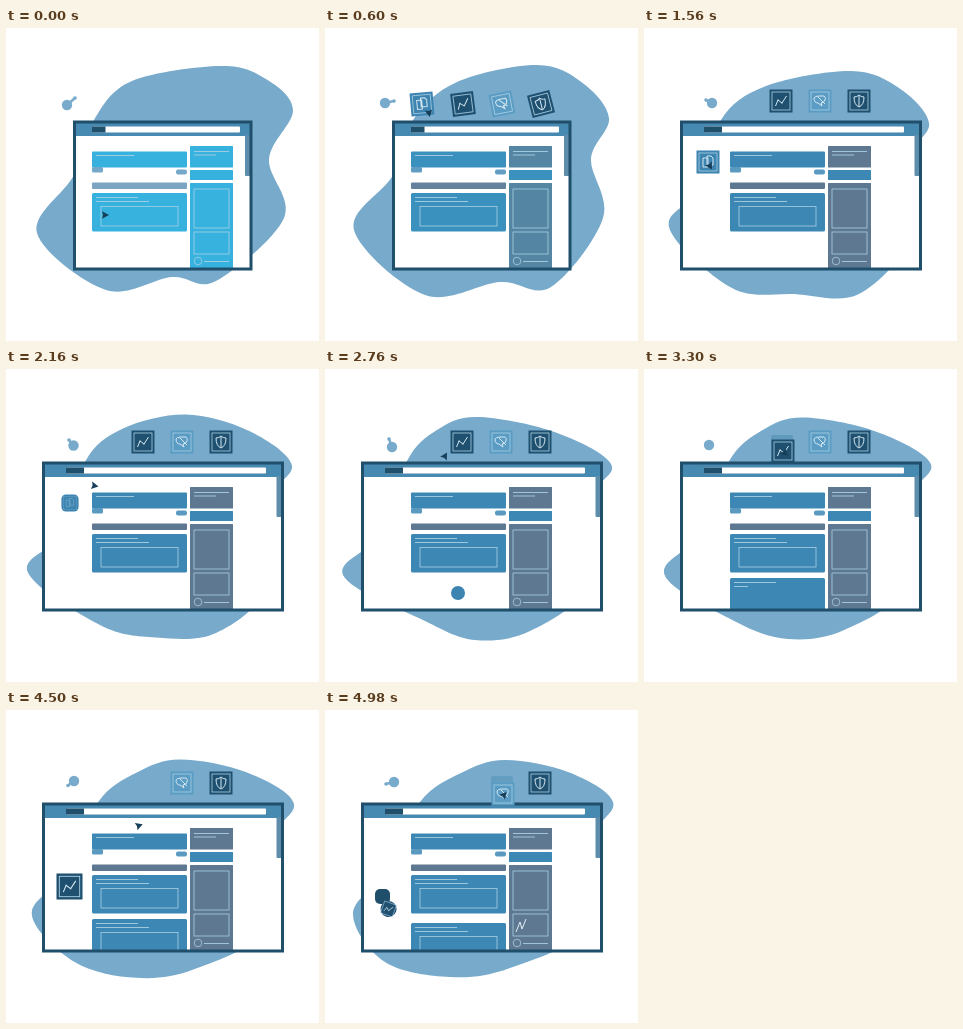
Animation of 313 by 313 pixels, one loop 5040 ms. Source, as an HTML page:

```html
<!DOCTYPE html>
<html lang="en">
<head>
<meta charset="utf-8">
<title>Window builder</title>
<style>
html, body { margin: 0; width: 100%; height: 100%; overflow: hidden; background: #fff; }
svg { display: block; width: 100vw; height: 100vh; }
</style>
</head>
<body>
<svg id="stage" viewBox="0 0 313 313"></svg>
<script>
const LOOP = 5040, STEP = 60;
const DARK = '#1f4f6b', BLUE = '#3c87b4', PALE = '#78aacb', LIGHT = '#a9cfe3';
const stage = document.getElementById('stage');

const clamp = v => Math.max(0, Math.min(1, v));
const smooth = p => p * p * (3 - 2 * p);
const linear = p => p;
const lerp = (a, b, p) => a + (b - a) * p;
const ramp = (t, from, to) => smooth(clamp((t - from) / (to - from)));

// Each key is [time, ...values].
function track(t, keys, ease = smooth) {
  let i = 0;
  while (i < keys.length - 2 && t >= keys[i + 1][0]) i++;
  const [t0, ...a] = keys[i], [t1, ...b] = keys[i + 1];
  const p = ease(clamp((t - t0) / (t1 - t0)));
  return a.map((v, n) => lerp(v, b[n], p));
}

function mix(a, b, p) {
  const channel = (c, i) => parseInt(c.slice(i, i + 2), 16);
  return `rgb(${[1, 3, 5].map(i => Math.round(lerp(channel(a, i), channel(b, i), p)))})`;
}

const box = (x, y, w, h, fill, rx = 0) =>
  `<rect x="${x}" y="${y}" width="${w}" height="${h}" rx="${rx}" fill="${fill}"/>`;
const frame = (x, y, w, h) =>
  `<rect x="${x}" y="${y}" width="${w}" height="${h}" fill="none" stroke="${LIGHT}" stroke-width=".8"/>`;
const line = (x1, x2, y) =>
  `<path d="M${x1} ${y}H${x2}" stroke="${LIGHT}" stroke-width=".9"/>`;
const dot = (x, y, r, fill) => `<circle cx="${x}" cy="${y}" r="${r}" fill="${fill}"/>`;
const group = (opacity, content) => opacity > 0 ? `<g opacity="${opacity}">${content}</g>` : '';

function closedCurve(points) {
  const n = points.length, at = i => points[(i + n) % n];
  let d = `M${at(0)}`;
  for (let i = 0; i < n; i++) {
    const [a, b, c, e] = [at(i - 1), at(i), at(i + 1), at(i + 2)];
    const h1 = b.map((q, k) => q + (c[k] - a[k]) / 6);
    const h2 = c.map((q, k) => q - (e[k] - b[k]) / 6);
    d += `C${h1} ${h2} ${c}`;
  }
  return d + 'Z';
}

// Only the visible lobes are keyed; the rest follows from them.
function blob(t) {
  const [ax, bx, by, cx, cy, ex, ey, hx, hy, ix, iy, jx, jy, kx, ky] = track(t, [
    [0, 88, 126, 53, 215, 38, 287, 82, 210, 253, 166, 249, 100, 262, 31, 205],
    [600, 88, 132, 54, 212, 37, 284, 90, 226, 259, 175, 254, 100, 267, 29, 202],
    [1560, 77, 122, 58, 207, 43, 285, 95, 215, 266, 150, 266, 88, 260, 25, 199],
    [2760, 82, 112, 61, 152, 48, 286, 95, 205, 262, 150, 271, 100, 252, 18, 206],
    [4980, 95, 136, 63, 180, 50, 288, 92, 185, 258, 125, 267, 60, 252, 28, 204]
  ], linear);
  const late = clamp((t - 600) / 1500);
  return closedCurve([
    [ax, 92], [bx, by], [cx, cy], [(cx + ex) / 2 + 9, (cy + ey) / 2 - 9], [ex, ey],
    [lerp(263, 266, clamp(t / 600)), 131], [lerp(278, 262, late), lerp(190, 217, late)],
    [hx, hy], [ix, iy], [jx, jy], [kx, ky], [lerp(68, 60, late), lerp(147, 162, late)]
  ]);
}

function droplet(t) {
  const [x, y, dx, dy] = track(t, [
    [0, 61, 77, 8, -7], [600, 60, 75, 9, -2], [1560, 68, 75, -6, -3],
    [2760, 67, 78, -3, -8], [3300, 65, 76, 0, -1], [4020, 67, 70, -4, 7],
    [4980, 69, 72, -8, 2]
  ], linear);
  return dot(x, y, 5.2, PALE) + dot(x + dx, y + dy, 1.8, PALE) +
    `<path d="M${x} ${y}l${dx} ${dy}" stroke="${PALE}" stroke-width="2.4"/>`;
}

const tileFills = ['#3d84b1', '#1f5070', '#5b9cc4', '#1f5070'];
const icons = [
  'M-5-4H0V5H-5ZM-1-6H3L5-4V3H-1Z',
  'M-5.5 5L-3-1L1 2L5.5-5M-3.6-1h1.2M.4 2h1.2',
  'M-6-3Q-5-5-1-5H4Q6-4 5-1Q4 2 1 2L2 5L-2 2Q-6 2-6-3ZM-2-4L5 3',
  'M0-6Q2-4 5-4Q5 4 0 6Q-5 4-5-4Q-2-4 0-6ZM0-5V5'
];

function tile(kind, x, y, turn = 0, size = 23, round = 0, detail = 1) {
  return `<g transform="translate(${x} ${y}) rotate(${turn})">` +
    box(-size / 2, -size / 2, size, size, tileFills[kind], round) +
    group(detail, `<g transform="scale(${size / 23})">${frame(-9, -9, 18, 18)}
      <path d="${icons[kind]}" fill="none" stroke="#d3e7f1"/></g>`) + '</g>';
}

// Resting tiles rise from behind the window and settle upright.
function rising(kind, t) {
  const start = 150 + 60 * kind, loose = 1 - ramp(t, 600, 840);
  const y = lerp(109, 73, ramp(t, start, start + 240));
  return tile(kind, 98 + 39 * kind + loose, y + 3 * loose, (-4 - 3.5 * kind) * loose);
}

function ghost(kind, t, start) {
  const fade = t < start ? 0 : 1 - ramp(t, start + 60, start + 300);
  return group(fade, box(88 + 39 * kind, 66, 22, 26, '#5f9abd', 2));
}

function firstTile(t) {
  if (t < 600 || t >= 2820) return '';
  const [x, y, turn] = track(t, [
    [600, 97, 76, -5], [1500, 64, 134, 0], [2160, 64, 134, 0], [2640, 133, 224, 0]
  ]);
  const p = ramp(t, 1980, 2280);
  return tile(0, x, y, turn, lerp(23, 14, p), 7 * p, 1 - p);
}

function secondTile(t) {
  if (t < 3240) return '';
  const [x, y] = track(t, [[3240, 137, 73], [3300, 139, 82], [4020, 63.5, 176.5]]);
  const p = ramp(t, 4680, 4980);
  const size = lerp(lerp(23, 26, ramp(t, 3300, 4020)), 16, p);
  const trail = p > 0 ? box(50, 179, lerp(26, 15, p), lerp(23, 15, p), DARK, 5 * p) : '';
  return trail + tile(1, x, y + 22.5 * p, 20 * p, size, 8 * p);
}

function thirdTile(t) {
  const p = ramp(t, 4860, 4980);
  return t < 4860 ? '' : tile(2, 176 + 2 * p, 73 + 11 * p);
}

function cursor(t) {
  const [x, y, turn] = track(t, [
    [60, 99, 187, 0], [600, 104, 85, 80], [1500, 66, 138, 60], [1680, 66, 138, 60],
    [2760, 120, 87, -60], [3240, 140, 76, 0], [3300, 141, 84, 40],
    [4020, 65, 178, 40], [4860, 177, 75, -60], [4980, 179, 85, -50]
  ]);
  return `<path d="M4 0L-3-3.8L-2 0L-3 3.8Z" fill="#173f59"
    transform="translate(${x} ${y}) rotate(${turn})"/>`;
}

function panel(y, color, detail = 1) {
  return box(86, y, 95, 38.5, color, 1.5) + line(90, 132, y + 4.5) +
    line(90, lerp(104, 143, detail), y + 8.5) + group(detail, frame(95, y + 13.5, 77, 19.5));
}

function newPanel(t) {
  if (t < 2820) return '';
  const p = ramp(t, 2820, 3120);
  if (p < 1) {
    return box(lerp(126, 86, p), lerp(217, 209, p), lerp(14, 95, p),
      lerp(14, 38.5, p), BLUE, lerp(7, 1.5, p));
  }
  return panel(209 + 4 * ramp(t, 4740, 4980), BLUE, ramp(t, 3300, 3600));
}

function page(t) {
  const p = clamp(t / 780);
  const main = mix('#37b2df', BLUE, p), side = mix('#37b2df', '#5d7890', p);
  const rule = mix('#7ba5c2', '#5d7890', p), tab = mix('#76a8c9', '#5b9ac0', p);
  return box(86, 123.5, 95, 16, main, 1) + line(90, 128, 127.5) +
    box(86, 139, 11, 5.5, tab, 1.5) + box(170, 141.5, 11, 5, tab, 2) +
    box(86, 154.5, 95, 6.5, rule, 1) + panel(165, main) +
    box(184, 118, 43, 21.5, side, .5) + line(188, 223, 123.5) + line(188, 210, 127) +
    box(184, 142, 43, 10, main, .5) + box(184, 155, 43, 85, side, .5) +
    frame(188, 161, 35, 39) + frame(188, 204, 35, 22) +
    `<circle cx="192" cy="233" r="3.8" fill="none" stroke="${LIGHT}" stroke-width=".8"/>` +
    line(198, 223, 233.5) +
    group(ramp(t, 4620, 4920),
      '<path d="M191 222L195 212L197 219L201 209" fill="none" stroke="#e2eff5"/>') +
    newPanel(t);
}

function browser(t) {
  const grow = ramp(t, 660, 1140);
  const left = lerp(68.5, 37.5, grow), right = lerp(245, 276.5, grow);
  const width = right - left;
  const barLeft = lerp(86, 60, grow), barRight = lerp(234, 260, grow);
  return box(left, 94, width, 147, '#fff') +
    box(left, 95, width, 13, '#468ab2') +
    box(barLeft, 98.5, barRight - barLeft, 6, '#fff', 1) +
    box(barLeft, 98.5, lerp(13.5, 18, grow), 6, DARK) +
    box(right - 6, 107, 5, 41, '#5e8cab', 1) +
    `<clipPath id="inside">${box(left, 95, width, 145, '#fff')}</clipPath>
    <g clip-path="url(#inside)">${page(t)}</g>
    <rect x="${left}" y="94" width="${width}" height="147" fill="none"
      stroke="${DARK}" stroke-width="3"/>`;
}

function draw(t) {
  stage.innerHTML =
    `<path d="${blob(t)}" fill="${PALE}"/>` + droplet(t) +
    ghost(1, t, 3240) + ghost(2, t, 4860) +
    (t < 600 ? rising(0, t) : '') + (t < 3240 ? rising(1, t) : '') +
    (t < 4860 ? rising(2, t) : '') + rising(3, t) +
    browser(t) + firstTile(t) + secondTile(t) + thirdTile(t) + cursor(t);
}

const begin = performance.now();
function tick() {
  const t = (performance.now() - begin) % LOOP;
  draw(Math.floor(t / STEP) * STEP);
  requestAnimationFrame(tick);
}
tick();
</script>
</body>
</html>
```
